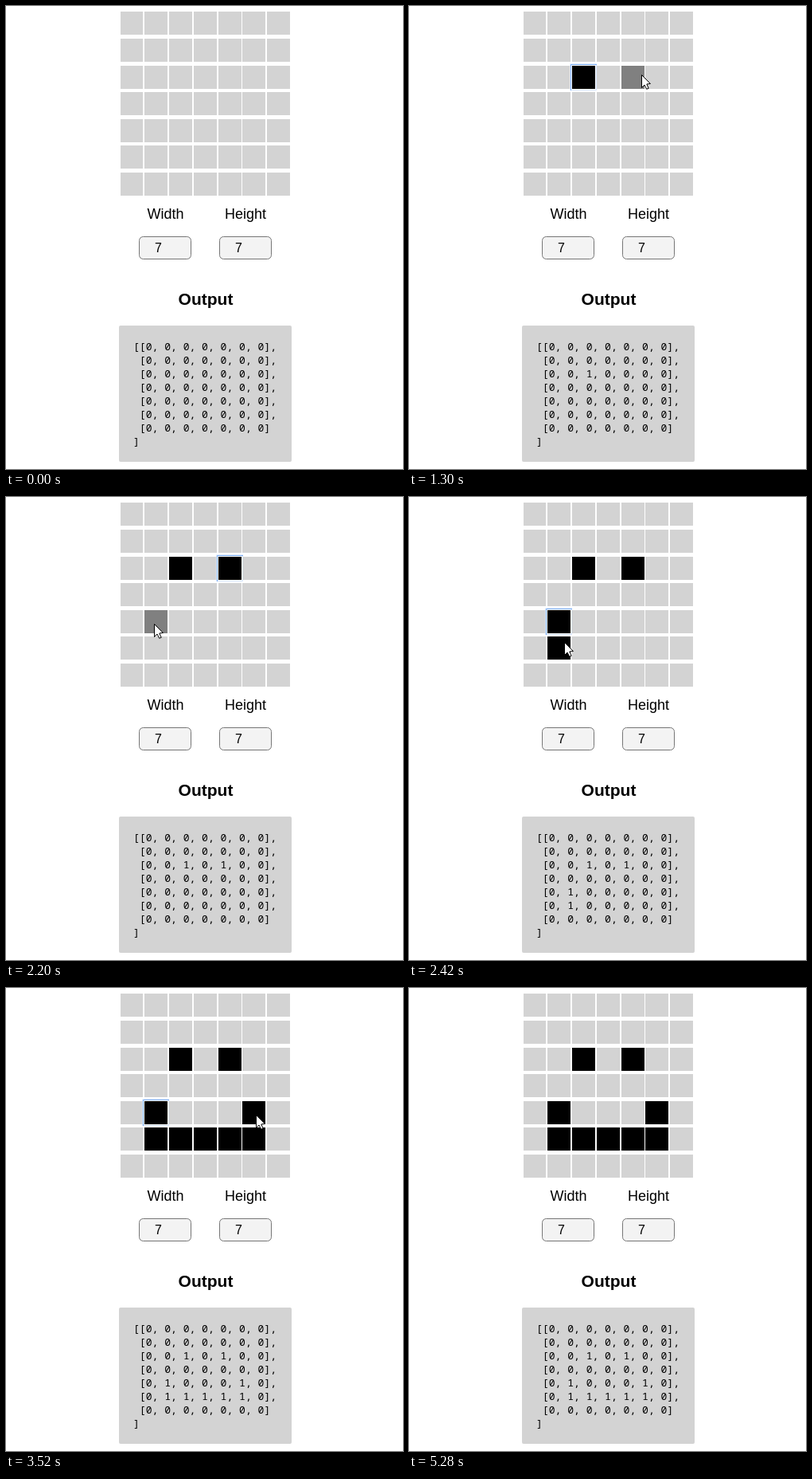
Recreate the animation shown at these times as an HTML page. Size 499 px wide and 581 px high, loop 5420 ms.

```html
<!DOCTYPE html>
<html lang="en">
<head>
<meta charset="utf-8">
<title>Grid to array</title>
<style>
  html, body { margin: 0; width: 100%; height: 100%; overflow: hidden; background: #fff; }
  svg { display: block; }
  text { font-family: "Liberation Sans", Arial, sans-serif; }
  .label { font-size: 18px; text-anchor: middle; }
  .field { fill: #f3f3f3; stroke: #767676; }
  .value { font-size: 16px; }
  .title { font-size: 21px; font-weight: bold; text-anchor: middle; }
  .code text { font: 13.05px "Noto Sans Mono", monospace; white-space: pre; }
</style>
</head>
<body>
<svg width="499" height="581" viewBox="0 0 499 581">
  <g id="grid" shape-rendering="crispEdges"></g>
  <g id="ring" fill="none">
    <path d="M-1.5 31V-1.5H31" stroke="#7aacf3"/>
    <path d="M-2.5 31V-2.5H31" stroke="#e3eefd"/>
    <path d="M30.5 -1V30.5H-1" stroke="#d3e3fb"/>
  </g>
  <text class="label" x="200.4" y="267">Width</text>
  <text class="label" x="301" y="267">Height</text>
  <rect class="field" x="167.5" y="289.5" width="65" height="28" rx="5"/>
  <rect class="field" x="268.5" y="289.5" width="65" height="28" rx="5"/>
  <text class="value" x="187" y="309">7</text>
  <text class="value" x="288" y="309">7</text>
  <text class="title" x="251" y="375">Output</text>
  <rect x="142" y="401" width="217" height="171" rx="2" fill="#d3d3d3"/>
  <g id="code" class="code"></g>
  <path id="arrow" d="M.5 .5V16.5L4 13L6.7 18.3L9.2 17.3L6.8 12L11.4 11.5Z" fill="#fff" stroke="#000"/>
  <path id="beam" d="M0 .5H3M4 .5H7M3.5 1V15M0 15.5H3M4 15.5H7" fill="none" stroke="#000" shape-rendering="crispEdges"/>
</svg>
<script>
const LOOP = 5420, SIZE = 7;
const $ = id => document.getElementById(id);

// time, x, y, pointer kind
const moves = [
  [0], [430, 229, 54, 'arrow'], [550, 221, 89, 'arrow'],
  [980, 252, 88, 'arrow'], [1080, 287, 86, 'arrow'],
  [1300, 292, 86, 'arrow'], [1420, 289, 86, 'arrow'],
  [1740, 203, 168, 'arrow'], [1860, 192, 160, 'arrow'], [1980, 188, 158, 'arrow'],
  [2200, 186, 159, 'arrow'], [2420, 195, 182, 'arrow'],
  [2640, 222, 182, 'arrow'], [2760, 251, 181, 'arrow'], [2860, 278, 180, 'arrow'],
  [3080, 307, 184, 'arrow'], [3300, 310, 184, 'arrow'], [3520, 314, 159, 'arrow'],
  [3970, 267, 296, 'arrow'], [4070, 310, 412, 'arrow'],
  [4190, 309, 472, 'beam'], [4410, 303, 476, 'beam'], [4620, 334, 520, 'beam'],
  [4840, 372, 546, 'arrow'], [4960, 414, 570, 'arrow'], [5060]
];

// time, row, column
const paints = [
  [940, 2, 2], [1740, 2, 4], [2320, 4, 1], [2420, 5, 1], [2640, 5, 2],
  [2760, 5, 3], [2860, 5, 4], [3080, 5, 5], [3520, 4, 5]
];
const focuses = [[0], [940, 2, 2], [1740, 2, 4], [2320, 4, 1], [5280]];

const left = c => Math.round(143.5 + 30.76 * c);
const right = c => Math.round(172.47 + 30.76 * c);
const top_ = r => Math.round(7.4 + 33.6 * r);
const latest = (list, t) => list.filter(e => e[0] <= t).pop();

function add(parent, tag, attrs) {
  const el = document.createElementNS('http://www.w3.org/2000/svg', tag);
  for (const k in attrs) el.setAttribute(k, attrs[k]);
  return parent.appendChild(el);
}

function place(el, x, y) {
  el.setAttribute('visibility', x === undefined ? 'hidden' : 'visible');
  if (x !== undefined) el.setAttribute('transform', `translate(${x} ${y})`);
}

const cells = [], lines = [];
for (let r = 0; r < SIZE; r++) {
  for (let c = 0; c < SIZE; c++) {
    const rect = add($('grid'), 'rect', { x: left(c), y: top_(r), width: right(c) - left(c), height: 29 });
    cells.push({ r, c, rect });
  }
}
for (let r = 0; r <= SIZE; r++) lines.push(add($('code'), 'text', { x: 160, y: 432 + 17 * r }));
lines[SIZE].textContent = ']';

function draw(t) {
  const [, x, y, kind] = latest(moves, t);
  const grid = Array.from({ length: SIZE }, () => Array(SIZE).fill(0));
  for (const [at, r, c] of paints) if (at <= t) grid[r][c] = 1;

  for (const { r, c, rect } of cells) {
    const hover = x >= left(c) && x < right(c) && y >= top_(r) && y < top_(r) + 29;
    rect.setAttribute('fill', grid[r][c] ? '#000' : hover ? '#808080' : '#d3d3d3');
  }
  grid.forEach((row, r) => {
    lines[r].textContent = (r ? ' [' : '[[') + row.join(', ') + (r < SIZE - 1 ? '],' : ']');
  });

  const [, fr, fc] = latest(focuses, t);
  place($('ring'), fr === undefined ? fr : left(fc), top_(fr));
  for (const id of ['arrow', 'beam']) place($(id), kind === id ? x : undefined, y);
}

const start = performance.now();
function tick() {
  draw((performance.now() - start) % LOOP);
  requestAnimationFrame(tick);
}
tick();
</script>
</body>
</html>
```
